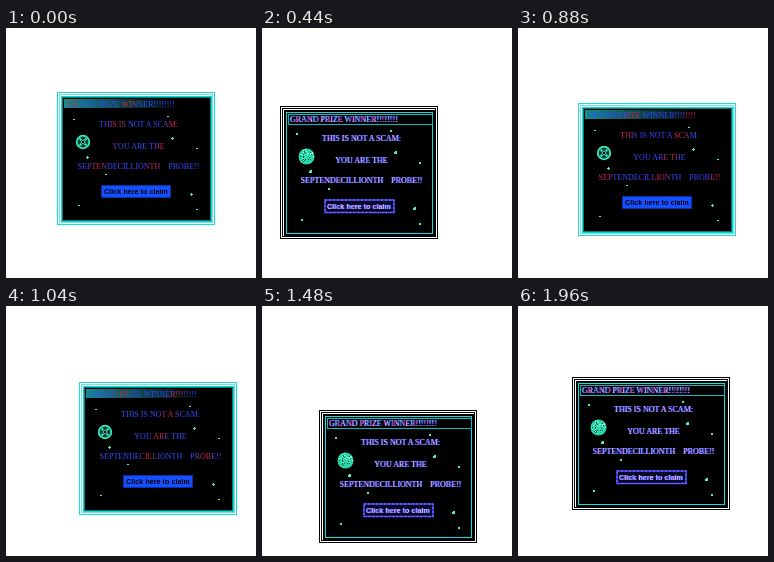
These frames come from a looping animation (250x250 px, 2000 ms). An HTML page:

```html
<!DOCTYPE html>
<html lang="en">
<head>
<meta charset="utf-8">
<style>
html, body { margin: 0; width: 100%; height: 100%; overflow: hidden; background: #fff; }
svg { display: block; width: 250px; height: 250px; }
text { font: 8px "Liberation Serif", "Times New Roman", serif; }
.mid { text-anchor: middle; }
.btn { font: bold 7px "Liberation Sans", Arial, sans-serif; letter-spacing: .1px; text-anchor: middle; }
</style>
</head>
<body>
<svg viewBox="0 0 250 250">
  <defs>
    <linearGradient id="bar">
      <stop offset="0" stop-color="#168c8c"/><stop offset=".4" stop-color="#0b4448"/><stop offset=".75" stop-color="#000"/>
    </linearGradient>
    <linearGradient id="ink" gradientUnits="userSpaceOnUse" x2="46" y2="22" spreadMethod="repeat">
      <stop offset="0" stop-color="#2850ff"/><stop offset=".6" stop-color="#4040ff"/>
      <stop offset=".75" stop-color="#e02040"/><stop offset=".85" stop-color="#c02458"/><stop offset="1" stop-color="#2850ff"/>
    </linearGradient>
    <linearGradient id="glow" gradientUnits="userSpaceOnUse" x2="11" y2="4" spreadMethod="repeat">
      <stop offset="0" stop-color="#b0c0ff"/><stop offset=".4" stop-color="#9c90ff"/>
      <stop offset=".7" stop-color="#ffb0e0"/><stop offset="1" stop-color="#b0c0ff"/>
    </linearGradient>
    <linearGradient id="hot" gradientUnits="userSpaceOnUse" x2="9" y2="4" spreadMethod="repeat">
      <stop offset="0" stop-color="#ff3050"/><stop offset=".35" stop-color="#ffd0e8"/>
      <stop offset=".65" stop-color="#50d8ff"/><stop offset="1" stop-color="#ff3050"/>
    </linearGradient>
  </defs>
  <g id="win">
    <g id="neon"></g>
    <g id="edge"></g>
  </g>
</svg>
<script>
const STEP = 40, FRAMES = 50, WIDTH = 158, HEIGHT = 133;
// Key points of the closed drift: step, left, top
const keys = [
  [0, 51, 64], [2, 43, 59], [8, 17, 69], [11, 18, 78], [15, 30, 87], [18, 45, 77],
  [26, 73, 76], [30, 81, 89], [37, 57, 104], [44, 39, 92], [49, 54, 71]
];
const title = "GRAND PRIZE WINNER!!!!!!!!";
const label = "Click here to claim";
const lines = [[35, "THIS IS NOT A SCAM:"], [57, "YOU ARE THE"], [77, "SEPTENDECILLIONTH" + "\u00a0".repeat(4) + "PROBE!!"]];
const dots = [[16, 27], [110, 24], [139, 56], [48, 82], [21, 113], [139, 117]];
const sparks = [[115, 46], [30, 65], [134, 102]];

const byId = id => document.getElementById(id);
const rect = (x, y, w, h, fill, stroke = "none", more = "") =>
  `<rect x="${x}" y="${y}" width="${w}" height="${h}" fill="${fill}" stroke="${stroke}" ${more}/>`;
// Inner rings reach one pixel further right and down
const ring = (d, color, fill = "none") => {
  const cut = d < 4 ? 2 * d + 1 : 2 * d;
  return rect(d + .5, d + .5, WIDTH - cut, HEIGHT - cut, fill, color);
};
const text = (x, y, s, fill, cls = "") => `<text class="${cls}" x="${x}" y="${y}" fill="${fill}">${s}</text>`;
const fringed = (x, y, s, fill, cls) =>
  text(x + .8, y + .3, s, "#2850ff", cls) + text(x - .4, y, s, "#6848f0", cls) + text(x, y, s, fill, cls);
const sky = h =>
  dots.map(([x, y]) => rect(x, y, 2, h, "#50f0b8")).join("") +
  sparks.map(([x, y]) => rect(x - 1, y, 3, h, "#50f0b8") + rect(x, y - 1, h, 3, "#50f0b8")).join("");

function specks(cx, cy, r) {
  let seed = 7, out = "";
  const rnd = () => (seed = seed * 16807 % 2147483647) / 2147483647;
  for (let i = 0; i < 40; i++) {
    const a = rnd() * 6.283, d = r * Math.sqrt(rnd());
    const x = Math.floor(cx + d * Math.cos(a)), y = Math.floor(cy + d * Math.sin(a));
    out += rect(x, y, 1, 1, i % 2 ? "#0c5048" : "#90ffe0");
  }
  return out;
}

byId("neon").innerHTML =
  ring(0, "#18dcdc") + ring(2, "#60e8e4") + ring(4, "#08d8d0") + ring(5, "#087878", "#000") +
  rect(7, 7, 144, 9, "url(#bar)") + sky(1) +
  `<circle cx="26" cy="50" r="6.3" fill="#0a4038" stroke="#38e8b8" stroke-width="1.8"/>
   <path d="M22.5 46.5l7 7m0-7l-7 7" stroke="#48dcb4" stroke-width="1.8"/>
   <path d="M24.5 48.5l3 3m0-3l-3 3" stroke="#000"/>` +
  text(10, 15, title, "url(#ink)") +
  lines.map(([y, s]) => text(81.5, y, s, "url(#ink)", "mid")).join("") +
  rect(44.5, 93.5, 69, 12, "#1450ff", "#0830a0") + text(79, 102, label, "#000", "btn");

byId("edge").innerHTML =
  ring(0, "#000") + ring(2, "#000") + ring(4, "#000", "#000") + ring(6, "#08e0e0") +
  rect(8.5, 8.5, 144, 10, "none", "#0cb8c0") + sky(2) +
  `<circle cx="26.5" cy="50.5" r="8" fill="#28d8a8"/>` + specks(26.5, 50.5, 7) +
  fringed(10, 16, title, "url(#hot)") +
  lines.map(([y, s]) => fringed(81.5, y, s, "url(#glow)", "mid")).join("") +
  rect(45, 94, 69, 12.5, "#080820", "#3048ff", 'stroke-width="1.6"') +
  rect(45, 94, 69, 12.5, "none", "#a868ff", 'stroke-dasharray="2 2"') +
  fringed(79, 103, label, "url(#glow)", "btn");

// Cyclic key lookup, wrapping the step count with the loop
function key(i) {
  const n = keys.length, turn = Math.floor(i / n), [t, x, y] = keys[i - turn * n];
  return [t + turn * FRAMES, x, y];
}

// Smooth Hermite curve through the keys
function place(n) {
  const next = keys.findIndex(k => k[0] > n), i = (next < 0 ? keys.length : next) - 1;
  const [a, b, c, d] = [-1, 0, 1, 2].map(o => key(i + o));
  const span = c[0] - b[0], u = (n - b[0]) / span, v = 1 - u;
  return [1, 2].map(j => {
    const out = (c[j] - a[j]) / (c[0] - a[0]) * span, into = (d[j] - b[j]) / (d[0] - b[0]) * span;
    return Math.round(v * v * ((1 + 2 * u) * b[j] + u * out) + u * u * ((1 + 2 * v) * c[j] - v * into));
  });
}

function draw(now) {
  const n = Math.floor(now / STEP) % FRAMES, [x, y] = place(n);
  byId("win").setAttribute("transform", `translate(${x} ${y})`);
  // Ink colours stay fixed to the stage while the window moves
  for (const id of ["ink", "glow", "hot"]) byId(id).setAttribute("gradientTransform", `translate(${-x} ${-y})`);
  byId("neon").style.display = n % 2 ? "none" : "";
  byId("edge").style.display = n % 2 ? "" : "none";
}

const start = performance.now();
function tick() {
  draw(performance.now() - start);
  requestAnimationFrame(tick);
}
tick();
</script>
</body>
</html>
```
